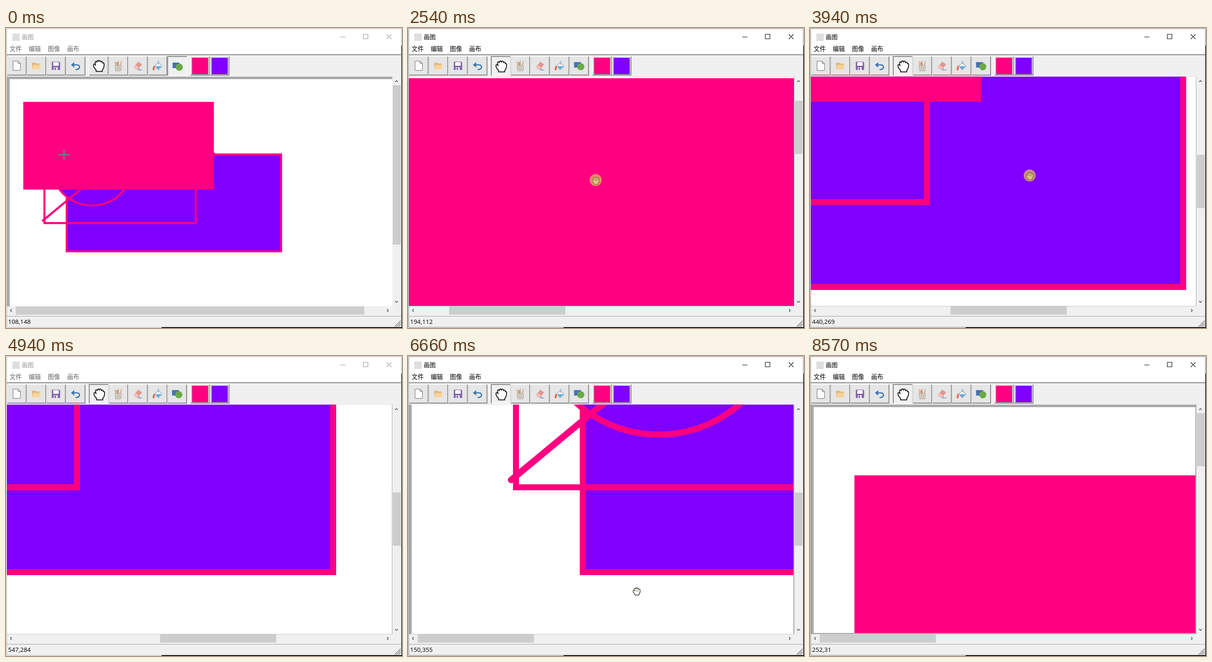
An HTML page with a canvas that plays this animation: 860x651 px, repeating every 8770 ms.

```html
<!DOCTYPE html>
<html lang="zh-CN">
<head>
<meta charset="utf-8">
<title>画图</title>
<style>
html, body { margin: 0; width: 100%; height: 100%; overflow: hidden; background: #fff; }
canvas { display: block; }
</style>
</head>
<body>
<canvas id="stage" width="860" height="651"></canvas>
<script>
const ctx = document.getElementById('stage').getContext('2d');
const LOOP = 8770, PITCH = 42.6, RATIO_X = 3.4, RATIO_Y = 4.43, UNIT = 1.087;
const PINK = '#ff0080', PURPLE = '#8000ff', FACE = '#f0f0f0', GRAY = '#a9a9a9';
const CJK = '"Noto Sans CJK SC", "Noto Sans CJK", sans-serif';

// The picture advances about every 100 ms within these spans and rests between them.
const SPANS = [[500, 600], [900, 1720], [1820, 2640], [2740, 3540], [3640, 4240], [4440, 4640],
  [4940, 5760], [5860, 6660], [6760, 7350], [7550, 8170], [8370, 8570]];
const STEPS = [0];
for (const [from, to] of SPANS) {
  const n = Math.round((to - from) / 100);
  for (let i = 0; i <= n; i++) STEPS.push(from + (to - from) * i / n);
}

// Pointer stops: time, place, and what is dragged on the way there.
const STOPS = [
  { t: 900, x: 126, y: 275 },
  { t: 1620, x: 227, y: 106 },
  { t: 1820, x: 210, y: 85 },
  { t: 2230, x: 640, y: 480 },
  { t: 2640, x: 330, y: 280, drag: 'hand' },
  { t: 2740, x: 633, y: 542 },
  { t: 3340, x: 291, y: 197, drag: 'hand' },
  { t: 3640, x: 791, y: 445 },
  { t: 3940, x: 477, y: 320, drag: 'hand' },
  { t: 4140, x: 377, y: 227, drag: 'hand' },
  { t: 4340, x: 377, y: 227 },
  { t: 4640, x: 900, y: 300 },
  { t: 4940, x: 900, y: 420 },
  { t: 5555, x: 530, y: 612 },
  { t: 6160, x: 206, y: 612, drag: 'barX' },
  { t: 7250, x: 839, y: 389 },
  { t: 7500, x: 839, y: 389 },
  { t: 8170, x: 839, y: 216, drag: 'barY' },
  { t: 8570, x: 900, y: 230 }
];

// Dragging moves the view, so the scroll offset follows from the pointer's path.
function poseAt(t) {
  let { x, y } = STOPS[0], sx = 0, sy = 0, drag;
  for (let i = 1; i < STOPS.length && STOPS[i - 1].t < t; i++) {
    const a = STOPS[i - 1], b = STOPS[i], p = Math.min(1, (t - a.t) / (b.t - a.t));
    const dx = (b.x - a.x) * p, dy = (b.y - a.y) * p;
    drag = b.drag;
    if (drag === 'hand') { sx -= dx; sy -= dy; }
    if (drag === 'barX') sx = Math.max(0, sx + dx * RATIO_X);
    if (drag === 'barY') sy = Math.max(0, sy + dy * RATIO_Y);
    x = a.x + dx;
    y = a.y + dy;
  }
  const zoom = t < 500 ? 1 : t < 600 ? 2 : 3;
  return { x, y, sx, sy, drag, zoom, onCanvas: x < 840 && y > 105 && y < 603 };
}

// The status bar keeps the last place the pointer had on the canvas; negatives wrap.
function statusAt(t) {
  const last = STEPS.filter(s => s <= t).map(poseAt).reverse()
    .find(p => p.onCanvas || p.drag === 'barX');
  if (last.drag === 'barX') return '0,0';
  const unit = v => {
    const n = Math.round(v / UNIT);
    return Math.round((n < 0 ? n + 2 ** 32 : n) / last.zoom);
  };
  return unit(Math.min(last.x, 830) - 8.5 + last.sx) + ',' + unit(last.y - 114 + last.sy);
}

function rect(x, y, w, h, color) {
  ctx.fillStyle = color;
  ctx.fillRect(x, y, w, h);
}
function circle(x, y, r, color) {
  ctx.fillStyle = color;
  ctx.beginPath();
  ctx.arc(x, y, r, 0, Math.PI * 2);
  ctx.fill();
}
function shape(d, x, y, fill, stroke, width = 1, scale = 1) {
  const path = new Path2D(d);
  ctx.save();
  ctx.translate(x, y);
  ctx.scale(scale, scale);
  if (fill) { ctx.fillStyle = fill; ctx.fill(path); }
  if (stroke) {
    ctx.strokeStyle = stroke;
    ctx.lineWidth = width;
    ctx.lineJoin = 'round';
    ctx.stroke(path);
  }
  ctx.restore();
}
function text(s, x, y, font, color) {
  ctx.font = font;
  ctx.fillStyle = color;
  ctx.fillText(s, x, y);
}
function clipped(box, paint) {
  ctx.save();
  ctx.beginPath();
  ctx.rect(...box);
  ctx.clip();
  paint();
  ctx.restore();
}

const HAND = 'M-5 11V8C-8 5-10 2-10-1C-10-4-7-4-6-1L-7-6C-7-9-4-9-3.5-7C-3.5-11 0-11 .5-8' +
  'C1-11 4.5-10 4.5-7C6-9 8-8 8-5C10-6 11-4 10.5-2C10.5 3 9 6 7 8V11Z';
const FILE_ICONS = [
  (x, y) => shape('M-8-10H3L8-5V10H-8ZM3-10V-5H8', x, y, '#fff', '#666', 1),
  (x, y) => {
    shape('M-9 7V-7H-3L-1-5H7V7Z', x, y, '#e3b677');
    shape('M-10 8L-6-2H10L7 8Z', x, y, '#f7d49c');
  },
  (x, y) => {
    shape('M-9-9H7L9-7V9H-9Z', x, y, '#7f5fa9');
    rect(x - 6, y - 8, 12, 8, '#fff');
    rect(x - 5, y + 3, 9, 6, '#eee8f4');
    rect(x - 3, y + 4, 3, 5, '#7f5fa9');
  },
  (x, y) => {
    shape('M-7-2H3C11-2 10 8 2 8H0', x, y, null, '#3f76ad', 2.6);
    shape('M-10-2L-3-8V4Z', x, y, '#3f76ad');
  }
];
const TOOL_ICONS = [
  (x, y) => shape(HAND, x, y, '#fff', '#222', 1.8, 1.12),
  (x, y) => {
    shape('M-5 0L-7-9M0 0V-11M4 0L7-10', x, y, null, '#cba67c', 2);
    shape('M-2-1L-3-8', x, y, null, '#d5674d', 2);
    shape('M-7-1H7L6 11H-6Z', x, y, '#dcd6cd', '#a59d93');
    shape('M-3 1V9M0 1V9M3 1V9', x, y, null, '#aaa297');
  },
  (x, y) => {
    shape('M-9 2L1-9L9-3L0 8H-5Z', x, y, '#e8948e');
    shape('M-9 2L-5-2L3 4L0 8H-5Z', x, y, '#f2c0ba');
    shape('M-1 9C3 4 4 7 3 9S6 9 10 8', x, y, null, '#5b82b8', 1.2);
  },
  (x, y) => {
    shape('M-6 0L2-8L10 1L1 9ZM2-3V-11', x, y, '#e8f1f8', '#6b8dac');
    shape('M-4 1H9L1 8Z', x, y, '#6aa9da');
    shape('M-5-1C-10 0-11 5-10 10C-7 11-6 7-6 3Z', x, y, '#e0654a');
  },
  (x, y) => {
    rect(x - 11, y - 8, 15, 12, '#4472b8');
    circle(x + 3.5, y + 2, 7.8, '#6aaa46');
  }
];

function button(x, sunken) {
  rect(x, 61, PITCH, 42, sunken ? '#696969' : '#fff');
  rect(x + 1, 62, PITCH - 1, 41, sunken ? '#fff' : '#696969');
  rect(x + 1, 62, PITCH - 2, 40, GRAY);
  rect(x + (sunken ? 2 : 1), sunken ? 63 : 62, PITCH - 3, 39, sunken ? '#f0f0f0' : '#e6e6e6');
}
function toolbar(icons, left, pressed) {
  icons.forEach((icon, i) => {
    const x = left + i * PITCH, shift = i === pressed ? 1 : 0;
    button(x, shift);
    icon(x + PITCH / 2 + shift, 82 + shift);
  });
}
const swatch = color => (x, y) => {
  rect(x - 18, y - 18, 36, 37, '#999');
  rect(x - 17, y - 17, 34.5, 35, color);
};

function chrome(active, tool) {
  const ink = active ? '#000' : '#999';
  rect(0, 0, 860, 651, '#fff');
  rect(14, 12, 16, 16, '#dedede');
  text('画图', 34, 24, '13px ' + CJK, ink);
  shape('M726 19.5H737M776 13.5H786V23.5H776ZM827 14L837 24M837 14L827 24', 0, 0, null, ink, 1.1);
  ['文件', '编辑', '图像', '画布'].forEach((s, i) =>
    text(s, 7.7 + i * 41.7, 50, '13.2px ' + CJK, active ? '#000' : '#666'));
  rect(2, 57, 856, 2, '#8c8c8c');
  rect(2, 59, 856, 590, FACE);
  toolbar(FILE_ICONS, 2, -1);
  toolbar(TOOL_ICONS, 180, tool);
  toolbar([swatch(PINK), swatch(PURPLE)], 400, -1);
}

function drawing() {
  rect(0, 0, 875, 652, '#fff');
  ctx.strokeStyle = PINK;
  ctx.lineWidth = 13 / 3;
  ctx.fillStyle = PURPLE;
  ctx.beginPath();
  ctx.rect(123.83, 163.5, 465.67, 210.2);
  ctx.fill();
  ctx.stroke();
  ctx.beginPath();
  ctx.arc(178.8, 185.2, 89, 0, Math.PI * 2);
  ctx.fill();
  ctx.stroke();
  ctx.strokeRect(75.5, 200, 328.5, 112.3);
  ctx.lineCap = 'round';
  ctx.lineWidth = 4.7;
  ctx.beginPath();
  ctx.moveTo(72, 307);
  ctx.lineTo(165, 230);
  ctx.stroke();
  ctx.lineCap = 'butt';
  rect(29.5, 49.33, 414, 190.33, PINK);
  rect(443.5, 158, .7, 3.3, PURPLE);
  rect(443.5, 160, 2.6, 1.3, PURPLE);
}

function view({ zoom, sx, sy }) {
  const far = zoom === 1 ? 1 : 0;
  clipped([2, 105.5, 836 + far, 497.5 + far], () => {
    rect(2, 105, 838, 500, GRAY);
    ctx.translate(8 - sx, 111 - sy);
    ctx.scale(zoom, zoom);
    drawing();
  });
  if (far) return;
  rect(838, 105, 1, 498, GRAY);
  rect(2, 603, 837, 1, '#ccc');
  if (!sx) rect(837, 105, 2, 498, GRAY);
  if (!sy) rect(2, 601, 837, 2, GRAY);
}

function scrollbars(barX, barY, colorX, colorY) {
  rect(2, 604, 836, 18, FACE);
  rect(840, 105, 17, 498, FACE);
  rect(...barX, colorX);
  rect(...barY, colorY);
  shape('M12.5 610L9.5 613L12.5 616M827.5 610L830.5 613L827.5 616' +
    'M845 117L848 114L851 117M845 592.5L848 595.5L851 592.5', 0, 0, null, '#444', 1.4);
}

function windowEdge(active) {
  rect(2, 625, 856, 1, '#a0a0a0');
  shape('M844 648L857 635M848 648L857 639M852 648L857 643', 0, 0, null, '#888', 1.5);
  ctx.strokeStyle = active ? '#777' : '#aaa';
  ctx.lineWidth = 1;
  ctx.strokeRect(1.5, 1.5, 857, 648);
  rect(859, 38, 1, 613, '#111');
  rect(338, 649, 522, 2, '#111');
}

function pointer({ x, y, drag }, kind, bar) {
  if (drag) circle(x, y, 13, 'rgba(238,190,90,.72)');
  if (bar) clipped(bar, () => circle(x, y, 13, '#6cab49'));
  if (kind === 'cross') {
    rect(x - 11, y - 1, 22, 2, '#5f948c');
    rect(x - 1, y - 11, 2, 22, '#5f948c');
  } else if (kind === 'hand') {
    shape(HAND, x, y + 1, drag ? '#dfc184' : '#fff', drag ? '#77683f' : '#222', 1.6, .75);
    shape('M-3-6L-1 1M1-7L2 1M5-6L5 1', x, y + 1, null, '#77683f', 1, .75);
  } else {
    shape('M0 0V17L4 13.5L7 20L10 18.7L7 12.5H12.5Z', x + .5, y + .5, '#fff', '#333');
  }
}

function draw(now) {
  const clock = now % LOOP;
  const t = STEPS.filter(s => s <= clock + .01).pop();
  const pose = poseAt(t), { x, y, sx, sy, drag, zoom } = pose;
  const active = t >= 1700 && !(t >= 4940 && t < 5400);
  const drawingTool = t < 1800;
  const barX = [21 + sx / RATIO_X, 604, 757 / zoom, 18];
  const barY = [840, 124 + sy / RATIO_Y, 17, 346 / zoom];
  const hovers = ([left, top, w, h]) => x >= left - 2 && x < left + w && y >= top && y < top + h;
  const tint = (name, bar) => drag === name ? '#606060' : hovers(bar) ? '#a6a6a6' : '#cdcdcd';

  chrome(active, drawingTool ? 4 : 0);
  view(pose);
  scrollbars(barX, barY, tint('barX', barX), tint('barY', barY));
  windowEdge(active);
  text(statusAt(t), 4.5, 642, '13.4px "Open Sans", sans-serif', '#000');
  const kind = !pose.onCanvas || x > 838 ? 'arrow' : drawingTool ? 'cross' : 'hand';
  pointer(pose, kind, { barX, barY }[drag]);
}

const start = performance.now();
function tick() {
  draw(performance.now() - start);
  requestAnimationFrame(tick);
}
tick();
</script>
</body>
</html>
```
